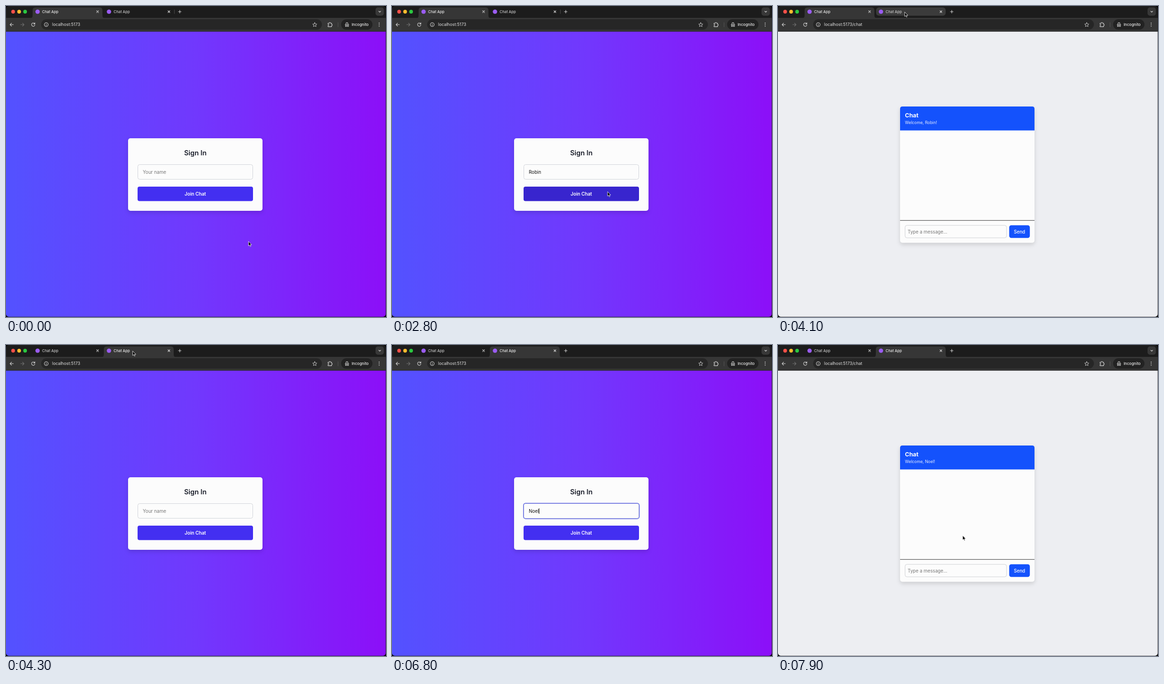
Animation of 800 by 656 pixels, one loop 8 s. Source, as an HTML page:

```html
<!DOCTYPE html>
<html lang="en">
<head>
<meta charset="utf-8">
<title>Chat App</title>
<style>
  html, body { margin: 0; width: 100%; height: 100%; overflow: hidden; background: #000; }
  svg { display: block; width: 800px; height: 656px; font-family: Inter, Roboto, sans-serif; }
  text { white-space: pre; }
  .icon { fill: none; stroke: #d4d4d4; stroke-width: 1.1; stroke-linecap: round; stroke-linejoin: round; }
  .tab { font-size: 7.7px; font-weight: 500; }
  .mid { text-anchor: middle; fill: #fff; }
  .field { font-size: 9.7px; }
  .card { fill: #fcfcfc; filter: drop-shadow(0 4px 4px #0002); }
</style>
</head>
<body>
<svg viewBox="0 0 800 656">
  <defs>
    <linearGradient id="sky">
      <stop offset="0" stop-color="#5352ff"/>
      <stop offset=".5" stop-color="#7138fd"/>
      <stop offset="1" stop-color="#8c0ff8"/>
    </linearGradient>
    <clipPath id="window"><rect width="799.5" height="655.5" rx="6"/></clipPath>
  </defs>
  <g clip-path="url(#window)">
    <rect width="800" height="656" fill="#1c1c1c"/>

    <!-- tab strip -->
    <circle cx="15" cy="12" r="3.9" fill="#fb5049"/>
    <circle cx="27.6" cy="12" r="3.9" fill="#fdbc2e"/>
    <circle cx="40.2" cy="12" r="3.9" fill="#2bc840"/>
    <rect id="tabHover" x="206.5" y="3" width="146.5" height="17.5" rx="6" fill="#3b3b3b"/>
    <path id="activeTab" d="M50 26q6 0 6-6V9q0-6 6-6h135q6 0 6 6v11q0 6 6 6z" fill="#363636"/>
    <g class="tab">
      <circle cx="66.5" cy="12" r="4.6" fill="#9a5cf2"/>
      <circle cx="216.8" cy="12" r="4.6" fill="#9a5cf2"/>
      <text id="label1" x="76" y="14.8">Chat App</text>
      <text id="label2" x="226.5" y="14.8">Chat App</text>
    </g>
    <g class="icon">
      <path d="M190.8 10l4 4m0-4l-4 4M341 10l4 4m0-4l-4 4M362.8 12h6m-3-3v6"/>
      <path id="tabLine" d="M354.5 8v8" stroke="#484848"/>
    </g>
    <rect x="778" y="3" width="17.5" height="17.5" rx="5" fill="#383838"/>
    <path class="icon" d="M784.8 11l2 2 2-2"/>

    <!-- toolbar -->
    <rect y="25" width="800" height="29" fill="#363636"/>
    <rect x="74" y="28" width="591" height="22" rx="11" fill="#262626"/>
    <rect x="705.5" y="28" width="66" height="22" rx="11" fill="#222"/>
    <g class="icon">
      <path d="M15.5 39.3h-7m3.2-3.2l-3.2 3.2 3.2 3.2"/>
      <path d="M31 39.3h7m-3.2-3.2l3.2 3.2-3.2 3.2" stroke="#707070"/>
      <path d="M60.3 37.4a3.5 3.5 0 1 0 .5 2.6M60.8 35.3v2.6h-2.6"/>
      <circle cx="84.7" cy="39.3" r="4"/>
      <path d="M84.7 39v2.2m0-4v.1"/>
      <path d="M650 35l1.3 2.9 3.1.3-2.3 2.1.7 3.1-2.8-1.6-2.8 1.6.7-3.1-2.3-2.1 3.1-.3z" stroke-width=".9"/>
      <path d="M678 36.2h2.5a1.4 1.4 0 0 1 2.8 0h2.2v2.4a1.4 1.4 0 0 1 0 2.8v2.2H678v-2.4a1.3 1.3 0 0 0 0-2.6z"/>
      <path d="M699 35v9" stroke="#555"/>
      <path d="M713.8 39.2h8m-6.2-1l.8-3h2.8l.8 3"/>
      <circle cx="715.8" cy="42" r="1.3"/><circle cx="719.9" cy="42" r="1.3"/>
    </g>
    <g fill="#d8d8d8">
      <circle cx="785.6" cy="36" r=".9"/><circle cx="785.6" cy="39.3" r=".9"/><circle cx="785.6" cy="42.6" r=".9"/>
      <text id="url" x="97" y="42.4" font-size="8.8" fill="#e3e3e3"></text>
      <text x="727.7" y="42.3" font-size="8" font-weight="500" fill="#ececec">Incognito</text>
    </g>

    <g id="signIn">
      <rect y="54" width="800" height="602" fill="url(#sky)"/>
      <rect class="card" x="257" y="279" width="283" height="153" rx="5"/>
      <text class="mid" x="398.6" y="315" font-size="14.4" font-weight="600" style="fill:#1b1f2b">Sign In</text>
      <rect id="box" x="277.5" y="334.5" width="242" height="31" rx="4" fill="#fcfcfc" stroke="#d1d4da"/>
      <rect id="ring" x="276.8" y="333.8" width="243.8" height="32.6" rx="4.5" fill="none" stroke="#6067e6" stroke-width="1.5"/>
      <text id="name" class="field" x="288" y="353.8"></text>
      <rect id="caret" y="344.5" width="1" height="11.5"/>
      <rect id="join" x="277" y="381" width="243" height="30.5" rx="4"/>
      <text class="mid" x="398.6" y="400" font-size="9.8" font-weight="600">Join Chat</text>
    </g>

    <g id="chat">
      <rect y="54" width="800" height="602" fill="#edeef2"/>
      <rect class="card" x="257" y="212" width="283" height="287.5" rx="5"/>
      <path d="M257 262.5V217q0-5 5-5h273q5 0 5 5v45.5z" fill="#1452fc"/>
      <text x="267.3" y="235" font-size="12.3" font-weight="700" fill="#fff">Chat</text>
      <text id="welcome" x="267.3" y="248.8" font-size="8.5" fill="#e9efff"></text>
      <rect x="257" y="451.8" width="283" height="1" fill="#333"/>
      <rect x="267.5" y="462.7" width="213.7" height="26.3" rx="4" fill="#fcfcfc" stroke="#cfd1d5"/>
      <text class="field" x="273" y="479.7" fill="#777">Type a message...</text>
      <rect x="486.7" y="462.5" width="43.5" height="26.7" rx="4.5" fill="#1452fc"/>
      <text class="mid" x="508.4" y="479.7" font-size="9.7" font-weight="500">Send</text>
    </g>
    <path d="M0 53.7h800" stroke="#222" stroke-width=".7"/>
    <path d="M799.3 54v602" stroke="#2228" stroke-width=".8"/>

    <g id="pointer">
      <path id="arrow" d="M0 0v9.3l2.1-1.9 1.5 3.3 1.5-.6-1.4-3.2h2.9z" fill="#000" stroke="#fff" stroke-width=".8" stroke-linejoin="round"/>
      <path id="beam" d="M-1.7-5q1.7 0 1.7 1.2V3.8Q0 5-1.7 5M1.7-5Q0-5 0-3.8M0 3.8Q0 5 1.7 5" fill="none" stroke="#111" stroke-width=".9"/>
    </g>
  </g>
</svg>
<script>
const $ = id => document.getElementById(id);
const show = (id, on) => $(id).style.display = on ? '' : 'none';
const set = (id, attrs) => { for (const k in attrs) $(id).setAttribute(k, attrs[k]); };

// One visitor per tab; keys holds the time of each key press.
const visits = [
  { name: 'Robin', focus: 800, keys: [1200, 1400, 1600, 1800, 2000], wake: 2300, press: 2700, route: 2900, enter: 2900 },
  { name: 'Noel', focus: 5200, keys: [5600, 6000, 6300, 6600], wake: 7100, press: 7700, route: 7800, enter: 7900 }
];
const SWITCH = 4300;

// Pointer moves: start, end, x, y
const moves = [
  [0, 600, 415, 350], [2300, 2700, 453.8, 391.7], [3200, 4000, 266.7, 12.7],
  [4400, 5100, 365, 350], [7100, 7700, 388.8, 402]
];
const ease = u => u * u * (3 - 2 * u);

function pointerAt(t) {
  let x = 510.5, y = 496.7;
  for (const [from, to, tx, ty] of moves) {
    const u = ease(Math.min(1, Math.max(0, (t - from) / (to - from))));
    x += (tx - x) * u;
    y += (ty - y) * u;
  }
  return [x, y];
}

function draw(t) {
  const second = t >= SWITCH;
  const v = visits[+second];
  const inChat = t >= v.enter;
  const typed = v.name.slice(0, v.keys.filter(k => t >= k).length);
  const focused = t >= v.focus && t < v.press;
  const [x, y] = pointerAt(t);
  const over = (l, top, r, b) => x >= l && x <= r && y >= top && y <= b;
  const overText = !inChat && over(277, 334, 520, 366);

  set('activeTab', { transform: `translate(${second ? 150 : 0})` });
  set('label1', { fill: second ? '#c6c6c6' : '#ececec' });
  set('label2', { fill: second ? '#ececec' : '#c6c6c6' });
  const overTab = over(206, 3, 353, 21);
  show('tabHover', !second && overTab);
  show('tabLine', !second && !overTab);
  $('url').textContent = 'localhost:5173' + (t >= v.route ? '/chat' : '');

  show('signIn', !inChat);
  show('chat', inChat);
  $('welcome').textContent = `Welcome, ${v.name}!`;
  $('name').textContent = typed || 'Your name';
  set('name', { fill: typed ? '#111' : '#777' });
  show('ring', focused);
  const lastKey = v.keys[typed.length - 1] || v.focus;
  show('caret', focused && (t - lastKey) % 1000 < 500);
  set('caret', { x: 288 + (typed && !inChat ? $('name').getComputedTextLength() : 0) });
  set('join', { fill: over(277, 381, 520, 411.5) ? '#3825ce' : '#432ff1' });

  show('pointer', t < v.keys[0] || t >= v.wake);
  set('pointer', { transform: `translate(${x} ${y})` });
  show('arrow', !overText);
  show('beam', overText);
}

function tick(now) {
  draw(Math.floor(now % 8000 / 100) * 100);
  requestAnimationFrame(tick);
}
draw(0);
requestAnimationFrame(tick);
</script>
</body>
</html>
```
